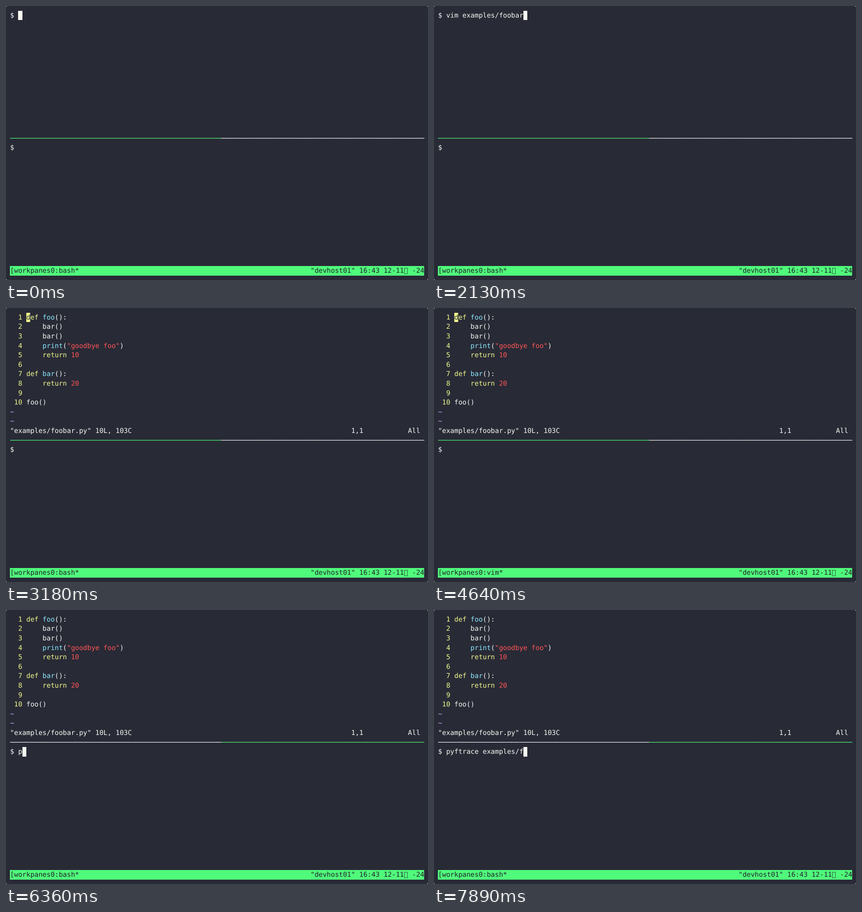
These frames come from a looping animation (873 px wide and 568 px high, 7990 ms). An HTML page:

```html
<!DOCTYPE html>
<html lang="en">
<head>
<meta charset="utf-8">
<title>Terminal session</title>
<style>
html, body { margin: 0; width: 100%; height: 100%; overflow: hidden; background: #fff; }
svg { display: block; }
text { font: 14px "DejaVu Sans Mono", monospace; white-space: pre; text-rendering: geometricPrecision; }
</style>
</head>
<body>
<svg id="stage" width="873" height="568" viewBox="0 0 873 568">
  <rect width="873" height="568" rx="3" fill="#282a36"/>
  <g id="screen"></g>
</svg>
<script>
const LOOP = 7990, CW = 8.4, RH = 19.6;
const EDITOR = 3180, RENAME = 4640, SWITCH = 4850;
const BG = '#282a36', FG = '#f8f8f2', GREEN = '#50fa7b', YELLOW = '#f1fa8c',
      CYAN = '#8be9fd', RED = '#ff5555', VIOLET = '#d6acff', INK = '#21222c';
const screen = document.getElementById('screen');

const colX = c => CW * (c + 1);
const rowY = r => RH * (r + 0.5);
const escapeXml = s => s.replace(/&/g, '&amp;').replace(/</g, '&lt;');

// Text on the cell grid: one x per character
function put(row, col, str, fill = FG, weight = 400) {
  const xs = [...str].map((_, i) => colX(col + i).toFixed(1)).join(' ');
  return `<text x="${xs}" y="${(rowY(row) + 14).toFixed(1)}" fill="${fill}" font-weight="${weight}">${escapeXml(str)}</text>`;
}

function block(row, col, cols, fill) {
  const x = Math.round(colX(col)), y = Math.round(rowY(row));
  const w = Math.round(colX(col + cols)) - x, h = Math.round(rowY(row + 1)) - y;
  return `<rect x="${x}" y="${y}" width="${w}" height="${h}" fill="${fill}"/>`;
}

// Consecutive coloured pieces on one row
function pieces(row, col, list) {
  let out = '';
  for (const [str, fill] of list) {
    out += put(row, col, str, fill);
    col += str.length;
  }
  return out;
}

// Each entry: time, characters that appear then
const topKeys = [
  [960, 'v'], [1035, 'i'], [1110, 'm'], [1185, ' '], [1260, 'e'], [1420, 'x'],
  [1640, 'amples/'], [1920, 'f'], [2025, 'o'], [2130, 'obar'], [2440, '.'], [2590, 'py ']
];
const bottomKeys = [
  [6360, 'p'], [6420, 'y'], [6640, 'f'], [6830, 'trace'], [7250, ' '],
  [7340, 'e'], [7490, 'x'], [7670, 'amples/'], [7890, 'f']
];
const typed = (keys, t) => '$ ' + keys.filter(k => k[0] <= t).map(k => k[1]).join('');

const code = [
  [['def ', YELLOW], ['foo', CYAN], ['():', FG]],
  [['    bar()', FG]],
  [['    bar()', FG]],
  [['    print', CYAN], ['(', FG], ['"goodbye foo"', RED], [')', FG]],
  [['    return ', YELLOW], ['10', RED]],
  [],
  [['def ', YELLOW], ['bar', CYAN], ['():', FG]],
  [['    return ', YELLOW], ['20', RED]],
  [],
  [['foo()', FG]]
];

function prompt(row, str, active) {
  return put(row, 0, str) + (active ? block(row, str.length, 1, FG) : '');
}

function editor(active) {
  let out = code.map((line, i) => {
    const num = String(i + 1);
    return put(i, 3 - num.length, num, YELLOW) + pieces(i, 4, line);
  }).join('');
  out += put(10, 0, '~', VIOLET, 700) + put(11, 0, '~', VIOLET, 700);
  out += put(12, 0, '"examples/foobar.py" 10L, 103C') + put(12, 84, '1,1') + put(12, 98, 'All');
  if (active) out += block(0, 4, 1, YELLOW) + put(0, 4, 'd', BG);
  return out;
}

function divider(topActive) {
  return put(13, 0, '─'.repeat(52), topActive ? GREEN : FG) +
         put(13, 52, '─'.repeat(50), topActive ? FG : GREEN);
}

function statusBar(job) {
  return block(27, 0, 102, GREEN) +
    put(27, 0, `[workpanes0:${job}*`, INK) +
    put(27, 74, '"devhost01" 16:43 12-11', INK) +
    `<rect x="824.25" y="543.45" width="6.3" height="11.7" fill="none" stroke="${INK}" stroke-width="0.7"/>` +
    put(27, 99, '-24', INK);
}

let shown = '';
function draw(t) {
  const topActive = t < SWITCH;
  const job = t >= RENAME && t < SWITCH ? 'vim' : 'bash';
  const markup =
    (t < EDITOR ? prompt(0, typed(topKeys, t), true) : editor(topActive)) +
    divider(topActive) +
    prompt(14, typed(bottomKeys, t), !topActive) +
    statusBar(job);
  if (markup !== shown) screen.innerHTML = shown = markup;
}

const start = performance.now();
function tick() {
  draw((performance.now() - start) % LOOP);
  requestAnimationFrame(tick);
}
tick();
</script>
</body>
</html>
```
